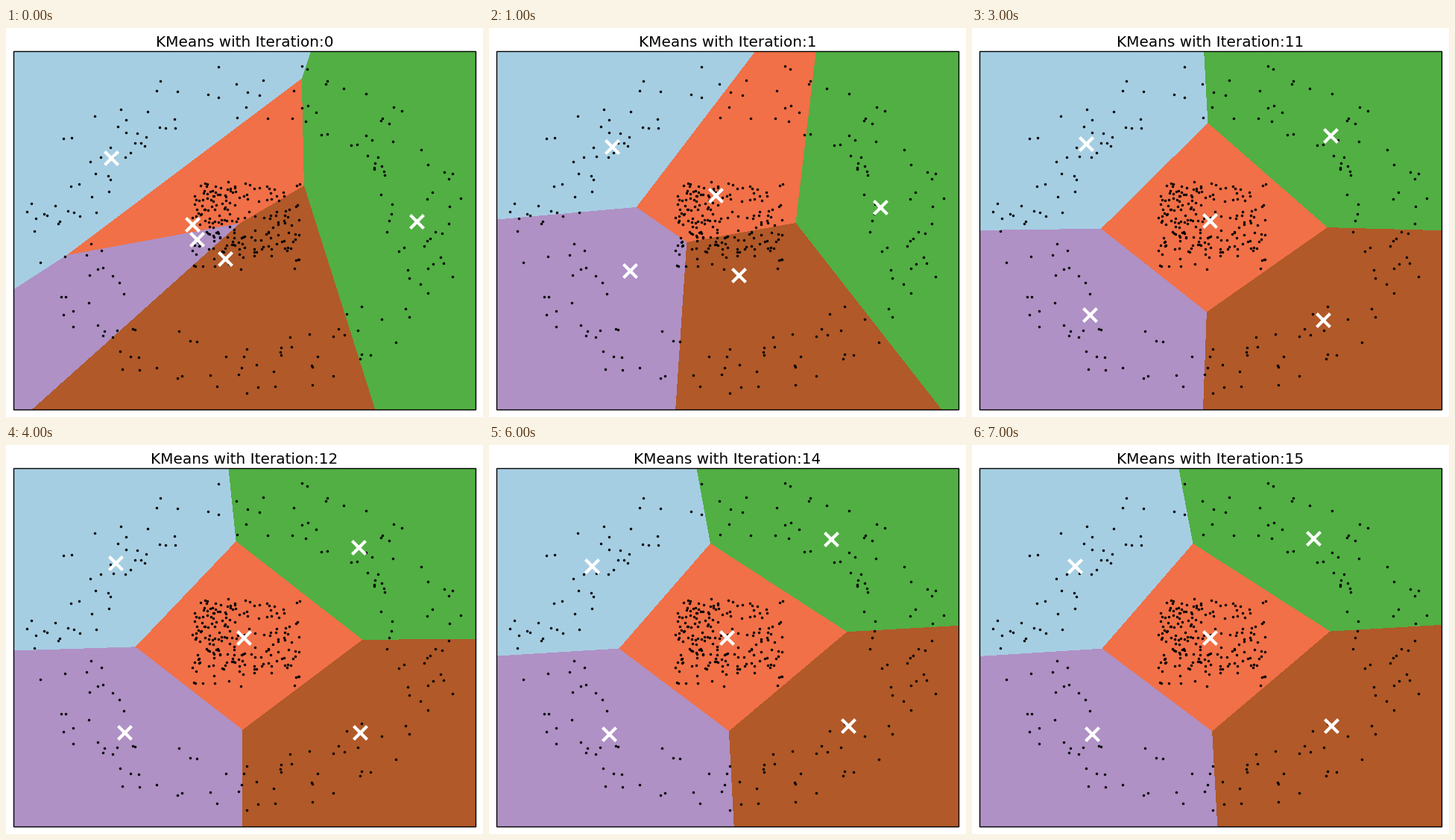
Animation, 640 px wide and 521 px high, one loop 8 s. Source, as a matplotlib script:

```python
import numpy as np
import matplotlib.pyplot as plt
from matplotlib.animation import FuncAnimation
from matplotlib.colors import ListedColormap
from matplotlib.patches import Rectangle

plt.rcParams.update({"font.family": "DejaVu Sans", "text.kerning_factor": 6})

W, H, DPI = 640, 521, 100
LEFT, TOP, BOX_W, BOX_H = 10, 31, 620, 480
X_WEIGHT = 0.612  # the data axes are stretched, so x counts less than y

ITERATIONS = [0, 1, 10, 11, 12, 13, 14, 15]
COLOURS = ["#a6cee3", "#51af43", "#f17047", "#af91c5", "#b15928"]

# Key positions of the cluster centres in pixels, in the order of COLOURS.
FIRST = [(141, 174), (551, 259), (250, 263), (256, 283), (294, 309)]
SECOND = [(165, 159), (525, 240), (304, 224), (189, 325), (335, 331)]
TENTH = [(155, 154), (485, 147), (319, 258), (157, 383), (469, 393)]
LAST = [(138, 162), (458, 125), (319, 258), (161, 387), (482, 376)]


def centres_at(iteration):
    """Two early steps, then an eased drift towards convergence."""
    if iteration < 10:
        return np.array([FIRST, SECOND][iteration], float)
    t = (iteration - 10) / 5
    start, end = np.array(TENTH), np.array(LAST)
    return start + (end - start) * (1 - (1 - t * t) ** 3.5)


def make_points(rng):
    """An elliptic ring around a block that is denser on its left side."""
    angle = rng.uniform(0, 2 * np.pi, 190)
    radius = rng.uniform(0.64, 1, 190)
    ring = np.column_stack([320 + 295 * radius * np.cos(angle),
                            268 + 228 * radius * np.sin(angle)])
    block = rng.uniform((250, 206), (400, 323), (135, 2))
    dense = rng.uniform((250, 205), (312, 298), (65, 2))
    return np.vstack([ring, block, dense])


def label_regions(centres):
    """Index of the nearest centre for every pixel of the plot."""
    y, x = np.mgrid[TOP:TOP + BOX_H, LEFT:LEFT + BOX_W]
    dist = [X_WEIGHT * (x - cx) ** 2 + (y + 0.8 - cy) ** 2
            for cx, cy in centres]
    return np.argmin(dist, axis=0)


fig = plt.figure(figsize=(W / DPI, H / DPI), dpi=DPI, facecolor="white")
ax = fig.add_axes([0, 0, 1, 1])
regions = ax.imshow(
    np.zeros((BOX_H, BOX_W)), cmap=ListedColormap(COLOURS), vmin=0, vmax=4,
    extent=(LEFT, LEFT + BOX_W, TOP + BOX_H, TOP),
    interpolation="nearest", aspect="auto")
ax.set(xlim=(0, W), ylim=(H, 0))
ax.axis("off")

points = make_points(np.random.default_rng(7))
ax.plot(points[:, 0], points[:, 1], "k.", ms=4, mew=0.5)
crosses = ax.scatter([], [], marker="x", s=169, linewidths=3, color="w",
                     zorder=10)
ax.add_patch(Rectangle((LEFT + 0.5, TOP + 0.5), BOX_W, BOX_H, fill=False,
                       ec="k", lw=1, snap=False, zorder=11))
title = ax.text(W / 2, 25, "", fontsize=14.4, ha="center", va="baseline")


def draw(i):
    centres = centres_at(ITERATIONS[i])
    regions.set_data(label_regions(centres))
    crosses.set_offsets(centres)
    title.set_text(f"KMeans with Iteration:{ITERATIONS[i]}")
    return regions, crosses, title


anim = FuncAnimation(fig, draw, frames=len(ITERATIONS), interval=1000,
                     repeat=True, repeat_delay=0)
plt.show()
```
